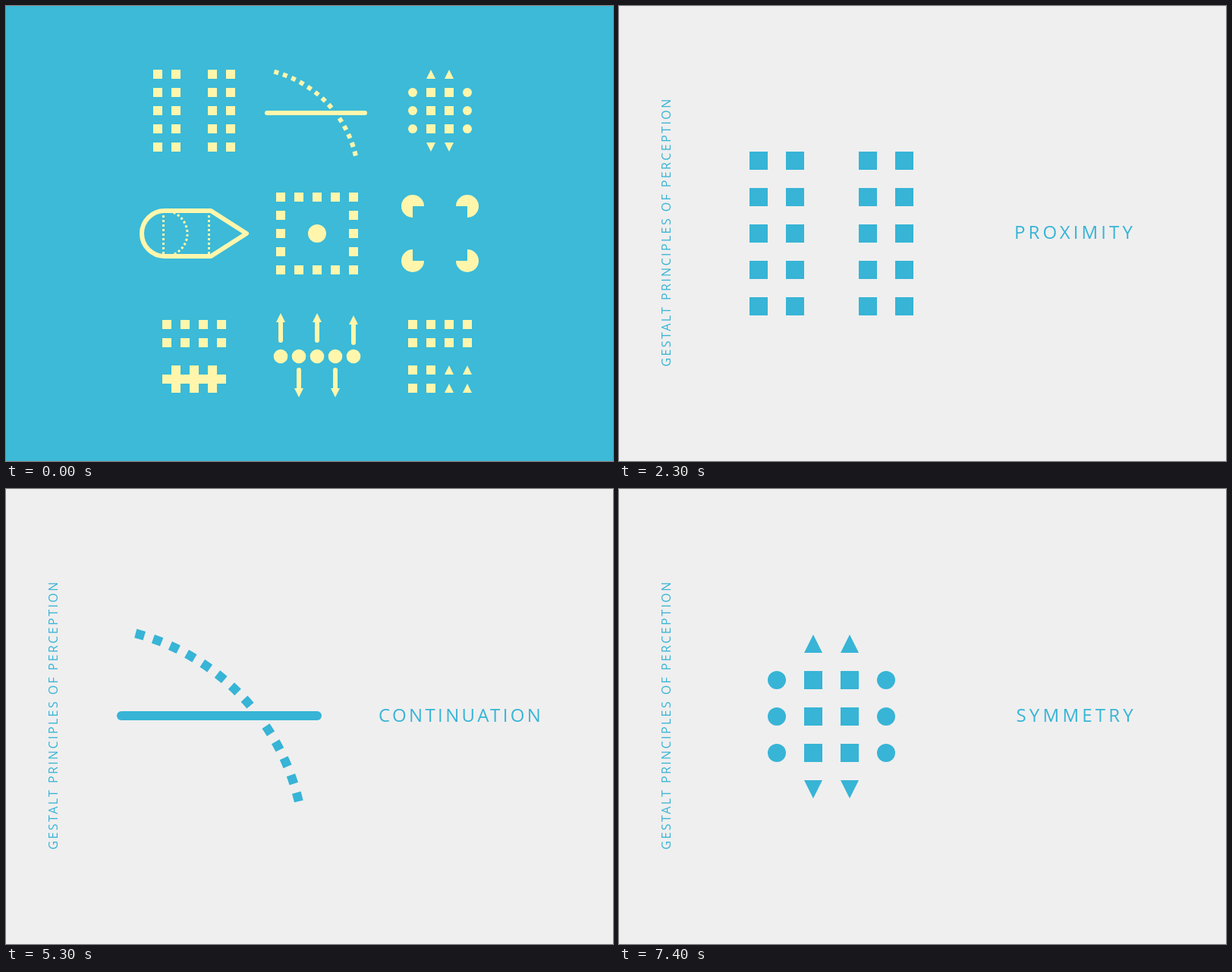
Recreate the animation shown at these times as an HTML page without scripts. Size 800 px wide and 600 px high, loop 8000 ms.

```html
<!DOCTYPE html>
<html lang="en">
<head>
<meta charset="utf-8">
<title>Gestalt principles</title>
<style>
  html, body { margin: 0; width: 100%; height: 100%; overflow: hidden; background: #efefef; }
  svg { display: block; width: 100vw; height: 100vh; font-family: "Open Sans", sans-serif; }

  .blue { color: #37b4d6; }
  .cream { color: #fff6ac; }
  .shape, text { fill: currentColor; }
  .line { fill: none; stroke: currentColor; }
  .big { stroke-width: 24; stroke-dasharray: 24; }
  .small { stroke-width: 12; stroke-dasharray: 12; }
  .arc { stroke-width: 12; stroke-dasharray: 12 12.2; }
  .bar { stroke-width: 12; }
  .dots { stroke-width: 3; stroke-dasharray: 3; }
  .outline { stroke-width: 6; stroke-linejoin: round; }
  .round { stroke-linecap: round; }

  .title { font-size: 24px; }
  .side { font-size: 16px; letter-spacing: 2.4px; }

  .scene { visibility: hidden; animation: 8s step-end infinite; }
  .overview { animation-name: overview; }
  .proximity { animation-name: proximity; }
  .continuation { animation-name: continuation; }
  .symmetry { animation-name: symmetry; }
  @keyframes overview { 0% { visibility: visible } 6.25%, 100% { visibility: hidden } }
  @keyframes proximity { 0% { visibility: hidden } 6.25% { visibility: visible } 43.75%, 100% { visibility: hidden } }
  @keyframes continuation { 0% { visibility: hidden } 43.75% { visibility: visible } 81.25%, 100% { visibility: hidden } }
  @keyframes symmetry { 0% { visibility: hidden } 81.25%, 100% { visibility: visible } }
</style>
</head>
<body>
<svg viewBox="0 0 800 600">
  <defs>
    <path id="columns" class="line big" d="M184 192V408M232 192V408M328 192V408M376 192V408"/>
    <g id="crossing">
      <path class="line arc" d="M170.8 190.4A299.6 299.6 0 0 1 322.2 285.9M342.5 312.7A299.6 299.6 0 0 1 386 412.9"/>
      <path class="line bar round" d="M152 299H410"/>
    </g>
    <path id="triangle" class="shape" d="M0 24L12 0L24 24Z"/>
    <g id="mirror-half">
      <path class="line big" d="M256 240V360"/>
      <use href="#triangle" x="244" y="192"/>
      <use href="#triangle" transform="translate(244 408) scale(1 -1)"/>
      <g class="shape">
        <circle cx="208" cy="252" r="12"/>
        <circle cx="208" cy="300" r="12"/>
        <circle cx="208" cy="348" r="12"/>
      </g>
    </g>
    <g id="mirror">
      <use href="#mirror-half"/>
      <use href="#mirror-half" transform="translate(560) scale(-1 1)"/>
    </g>
    <path id="corner" class="shape" d="M0 0H15A15 15 0 1 0 0 15Z"/>
    <g id="arrow">
      <path class="shape" d="M-6 12L0 0L6 12Z"/>
      <path class="line outline round" d="M0 11V36"/>
    </g>
    <path id="rows" class="line small" d="M0 6H84M0 30H84"/>
  </defs>

  <g class="blue">
    <text class="side" transform="translate(68 475.5) rotate(-90)">GESTALT PRINCIPLES OF PERCEPTION</text>
    <g class="scene proximity">
      <use href="#columns"/>
      <text class="title" x="521" y="307" letter-spacing="4.1">PROXIMITY</text>
    </g>
    <g class="scene continuation">
      <use href="#crossing"/>
      <text class="title" x="491" y="307" letter-spacing="3.35">CONTINUATION</text>
    </g>
    <g class="scene symmetry">
      <use href="#mirror"/>
      <text class="title" x="523.5" y="307" letter-spacing="4.2">SYMMETRY</text>
    </g>
  </g>

  <g class="scene overview cream">
    <rect width="800" height="600" fill="#3cbad8"/>
    <use href="#columns" transform="translate(108 -12) scale(.5)"/>
    <use href="#crossing" transform="translate(268 -8.5) scale(.5)"/>
    <use href="#mirror" transform="translate(432 -12) scale(.5)"/>

    <path class="line outline" d="M209 330A30 30 0 0 1 209 270H270L317 300L270 330Z"/>
    <path class="line dots" d="M207.5 270V330M267.5 270V330M209 270A30 30 0 0 1 209 330"/>

    <path class="line small" d="M356 252H464M356 348H464M362 270V330M458 270V330"/>
    <circle class="shape" cx="410" cy="300" r="12"/>

    <use href="#corner" transform="translate(536 264)"/>
    <use href="#corner" transform="translate(608 264) scale(-1 1)"/>
    <use href="#corner" transform="translate(536 336) scale(1 -1)"/>
    <use href="#corner" transform="translate(608 336) scale(-1)"/>

    <use href="#rows" x="206" y="414"/>
    <path class="line bar" d="M206 492H290M224 474V510M248 474V510M272 474V510"/>

    <g class="shape">
      <circle cx="362" cy="462" r="9.3"/>
      <circle cx="386" cy="462" r="9.3"/>
      <circle cx="410" cy="462" r="9.3"/>
      <circle cx="434" cy="462" r="9.3"/>
      <circle cx="458" cy="462" r="9.3"/>
    </g>
    <use href="#arrow" x="362" y="405"/>
    <use href="#arrow" x="410" y="405"/>
    <use href="#arrow" x="458" y="408"/>
    <use href="#arrow" transform="translate(386 516) scale(1 -1)"/>
    <use href="#arrow" transform="translate(434 516) scale(1 -1)"/>

    <use href="#rows" x="530" y="414"/>
    <path class="line small" d="M530 480H566M530 504H566"/>
    <g transform="translate(578 474) scale(.5)">
      <use href="#triangle"/>
      <use href="#triangle" x="48"/>
      <use href="#triangle" y="48"/>
      <use href="#triangle" x="48" y="48"/>
    </g>
  </g>
</svg>
</body>
</html>
```
